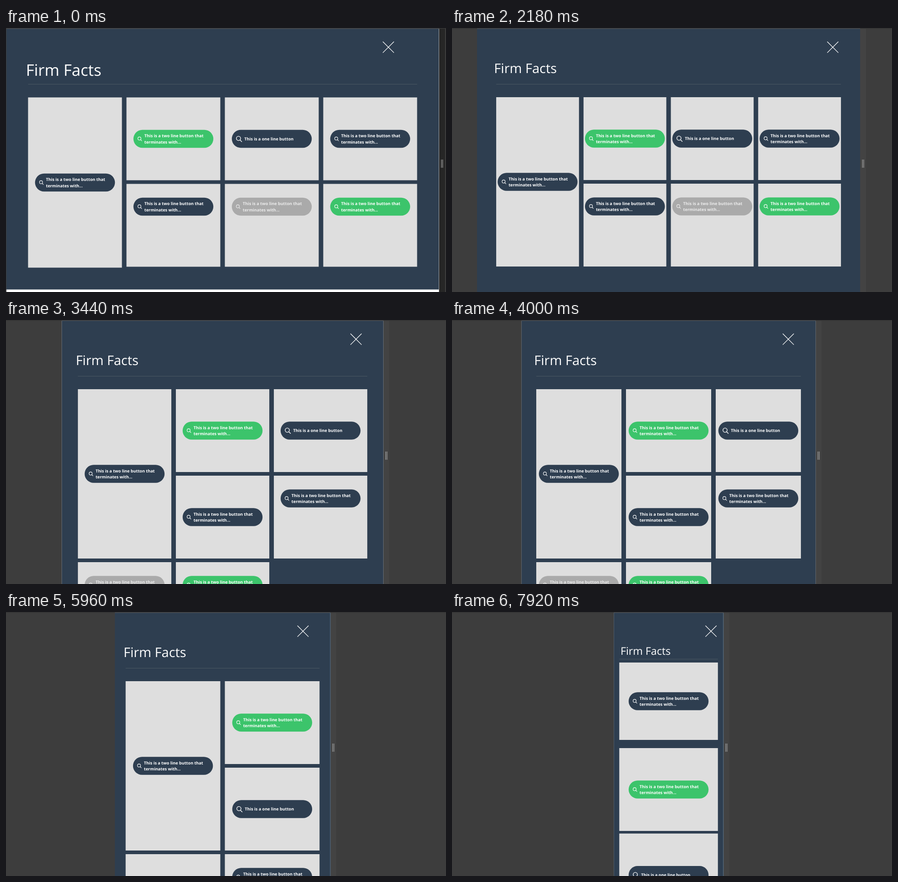
Animation, 966 px wide and 580 px high, one loop 7990 ms. Source, as an HTML page:

```html
<!DOCTYPE html>
<html lang="en">
<head>
<meta charset="utf-8">
<title>Firm Facts</title>
<style>
  html, body { margin: 0; width: 100%; height: 100%; overflow: hidden; background: #3d3d3d; }
  svg { display: block; width: 966px; height: 580px; text-rendering: geometricPrecision; }
  text { font-family: "Open Sans", "Noto Sans", sans-serif; fill: #fff; }
  .pill text { font-size: 9.07px; font-weight: 700; }
  .icon { fill: none; stroke: #fff; stroke-width: 1.1; stroke-linecap: round; }
  .icon.big { stroke-width: 1.4; }
  .card { fill: #dedede; }
  .navy rect { fill: #2e3e50; }
  .green rect { fill: #3cc46b; }
  .grey rect { fill: #aaa; }
  .grey text { fill: #ececec; }
  .grey .icon { stroke: #ececec; }
</style>
</head>
<body>
<svg id="stage" viewBox="0 0 966 580">
  <rect width="966" height="580" fill="#3d3d3d"/>
  <rect id="bar" y="1.5" width="13" height="579"/>
  <rect id="paper" y="1.5" height="579" fill="#fff"/>
  <rect id="page" y="1.5" fill="#2e3e50"/>
  <rect id="edge" y="1.5" width="1" height="579"/>
  <g id="grip" fill="#b0b0b0">
    <rect x="4.5" y="289" width="1.1" height="18"/>
    <rect x="7.4" y="289" width="1.1" height="18"/>
  </g>
  <path id="close" d="M-12.2 -12.2L12.2 12.2M12.2 -12.2L-12.2 12.2" stroke="#fff" stroke-width="1.3"/>
  <text id="title">Firm Facts</text>
  <rect id="rule" height="1" fill="#4b5863"/>
  <g id="cards"></g>
  <rect width="966" height="1.4" fill="#333"/>
</svg>
<script>
const LOOP = 7990, START = 500, STEP = 70, MID = 475.5;
const PILL_W = 175.5, PILL_H = 39.4, ROW = 182, GAP = 10, ROW_GAP = 8;

// left edge of the page over time: [ms, x]
const drag = [
  [780, 1], [1480, 25.5], [1620, 31], [2460, 67], [2810, 85.8], [3300, 115],
  [4000, 152.7], [4140, 160], [4700, 186], [4980, 199], [5820, 236],
  [5960, 239], [6660, 285], [7500, 330], [7920, 355.2]
];
const kinds = ['navy', 'green', 'navy one', 'navy', 'navy', 'grey', 'green'];

const $ = id => document.getElementById(id);
const set = (el, attrs) => {
  for (const key in attrs) el.setAttribute(key, attrs[key]);
};

function pillMarkup(kind) {
  const body = kind.includes('one')
    ? `<path class="icon big" d="M17.9 22.1L21.8 26"/><circle class="icon big" cx="14.7" cy="18.7" r="4.6"/>
       <text x="27.6" y="23">This is a one line button</text>`
    : `<path class="icon" d="M15.6 21.4L18.2 24.1"/><circle class="icon" cx="13.2" cy="19" r="3.4"/>
       <text x="24" y="16.6">This is a two line button that</text>
       <text x="24" y="30.2">terminates with...</text>`;
  return `<rect class="card"/><g class="pill ${kind}">
    <rect width="${PILL_W}" height="${PILL_H}" rx="${PILL_H / 2}"/>${body}</g>`;
}

$('cards').innerHTML = kinds.map(pillMarkup).join('');
const cards = [...document.querySelectorAll('.card')];
const pills = [...document.querySelectorAll('.pill')];

function leftAt(t) {
  if (t <= drag[0][0]) return drag[0][1];
  const i = drag.findIndex(p => p[0] >= t);
  if (i < 0) return drag[drag.length - 1][1];
  const [t0, a] = drag[i - 1], [t1, b] = drag[i];
  return a + (b - a) * (t - t0) / (t1 - t0);
}

function columnsFor(w) {
  return w > 812 ? 4 : w > 600 ? 3 : w > 440 ? 2 : 1;
}

// the first card spans two rows; the others flow around it
function cellOf(i, cols) {
  if (i < cols) return [i, 0];
  const n = i - cols;
  if (n < cols - 1) return [n + 1, 1];
  const rest = n - (cols - 1);
  return [rest % cols, 2 + Math.floor(rest / cols)];
}

function placeCards(x, width, cols, wide) {
  const w = (width - GAP * (cols - 1)) / cols;
  const top = wide ? 152.5 : 152;
  cards.forEach((card, i) => {
    let cx = x, y, h = ROW;
    if (cols === 1) {
      y = i ? 299 + (i - 1) * 187.7 : 111;
      if (!i) h = 170;
    } else {
      const [col, row] = cellOf(i, cols);
      cx = x + col * (w + GAP);
      y = top + row * (ROW + ROW_GAP);
      if (!i) h = wide ? 374 : 2 * ROW + ROW_GAP;
    }
    const inset = i > 3 ? 30.3 : (h - PILL_H) / 2;
    set(card, { x: cx, y, width: w, height: h });
    set(pills[i], { transform: `translate(${cx + (w - PILL_W) / 2} ${y + inset})` });
  });
}

function draw(now) {
  const time = now % LOOP;
  const t = time < START ? 0 : START + STEP * Math.floor((time - START) / STEP);
  const left = leftAt(t), right = 2 * MID - left, w = right - left;
  const wide = w > 928, cols = columnsFor(w), single = cols === 1;
  const short = wide || (w > 740 && w < 812);
  const x = left + w * 0.05, width = w * 0.9;

  set($('bar'), { x: t < START ? 951 : right, fill: t < START ? '#262626' : '#434343' });
  set($('paper'), { x: left, width: w });
  set($('page'), { x: left, width: w, height: short ? 573 : 579 });
  set($('edge'), {
    x: right - (wide ? 0 : 0.5),
    fill: wide ? '#a5a9ad' : '#587287',
    opacity: w > 850 || w < 500 ? 1 : 0
  });
  set($('grip'), { transform: `translate(${right + (wide ? 0.8 : 0)} 0)` });

  const inset = wide ? 110.5 : single ? 27.2 : 60;
  set($('close'), { transform: `translate(${right - inset} 42.2)` });
  set($('title'), {
    x: x + (single ? 2.7 : -4.7),
    y: wide ? 104.8 : single ? 93.6 : 98.9,
    'font-size': wide ? 34.9 : single ? 23.2 : 29
  });
  set($('rule'), { x, width, y: single ? 103 : 123 });
  placeCards(x, width, cols, wide);
}

function tick() {
  draw(performance.now());
  requestAnimationFrame(tick);
}
tick();
</script>
</body>
</html>
```
